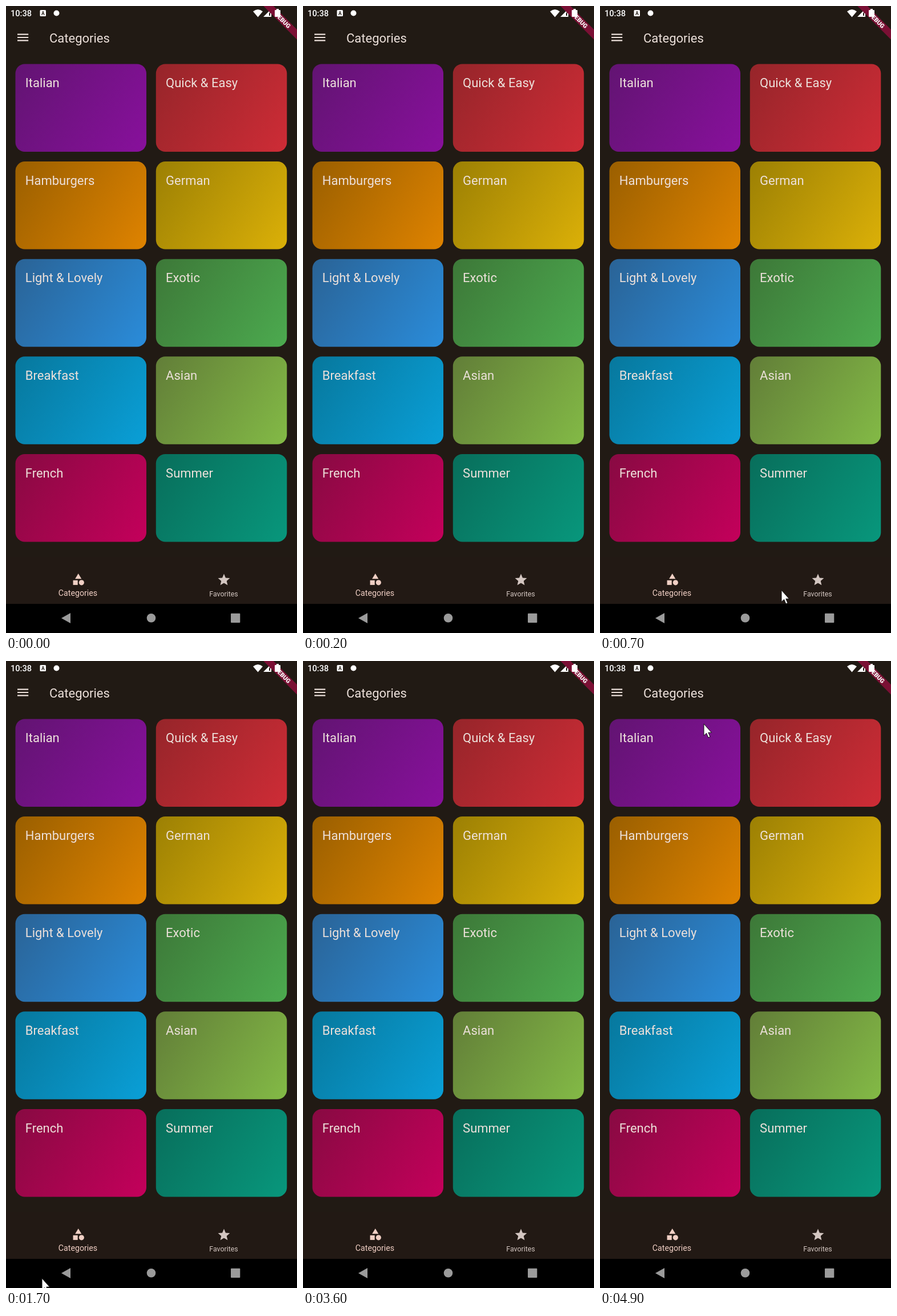
Recreate the animation shown at these times as an HTML page. Size 510x1097 px, loop 5.4 s.

```html
<!DOCTYPE html>
<html lang="en">
<head>
<meta charset="utf-8">
<title>Categories</title>
<style>
  html, body { margin: 0; width: 100%; height: 100%; overflow: hidden; background: #211a14; }
  svg { display: block; width: 510px; height: 1097px; font-family: Roboto, sans-serif; }
</style>
</head>
<body>
<svg viewBox="0 0 510 1097" xmlns="http://www.w3.org/2000/svg">
  <defs id="defs"></defs>
  <rect width="510" height="1097" fill="#211a14"/>
  <rect y="964" width="510" height="82" fill="#221914"/>
  <rect y="1046" width="510" height="51"/>

  <!-- status bar -->
  <g fill="#fff">
    <text x="8" y="18" font-size="14.6" font-weight="500">10:38</text>
    <rect x="59.5" y="7" width="10.5" height="11" rx="1.5"/>
    <text x="64.8" y="15.7" font-size="8.5" font-weight="700" text-anchor="middle" style="fill:#211a14">A</text>
    <circle cx="88.5" cy="12.5" r="5"/>
    <path d="M433 9.5Q441.500 2.500 450 9.500L441.500 19.500Z"/>
    <path fill-rule="evenodd" d="M465 5V19H451ZM463 10.500V17H461V12.500Z"/>
  </g>
  <g transform="translate(510) rotate(45)">
    <rect x="-45" y="29.100" width="90" height="12.500" fill="#7a1034"/>
  </g>
  <path d="M471 8Q471 7 472 7H474V5H478V7H480Q481 7 481 8V18Q481 19 480 19H472Q471 19 471 18Z" fill="#fff"/>
  <text transform="translate(510) rotate(45)" y="39.100" font-size="10.600" font-weight="900" text-anchor="middle" fill="#fff">DEBUG</text>

  <!-- app bar -->
  <path d="M20 49.600H39.200M20 55H39.200M20 60.400H39.200" stroke="#ece0da" stroke-width="2.100"/>
  <text x="76" y="63.500" font-size="22" fill="#ece0da">Categories</text>

  <g id="cards"></g>

  <!-- tabs -->
  <g transform="translate(114.500 991) scale(1.020)" fill="#f0cfc4">
    <path d="M12 2L6.500 11H17.500Z"/>
    <rect x="3" y="13.500" width="8" height="8"/>
    <circle cx="17.500" cy="17.500" r="4.500"/>
  </g>
  <path transform="translate(369.500 991.500) scale(1.040)" fill="#d3c6c1" d="M12 17.270L18.180 21l-1.640-7.030L22 9.240l-7.190-.61L12 2 9.190 8.630 2 9.240l5.460 4.730L5.820 21z"/>
  <g text-anchor="middle">
    <text x="126" y="1032" font-size="14.200" fill="#f0cfc4">Categories</text>
    <text x="381.500" y="1033" font-size="12.400" fill="#d3c6c1">Favorites</text>
  </g>

  <!-- system buttons -->
  <g fill="#9b9b9b">
    <path d="M97 1071L113 1062V1080Z"/>
    <circle cx="254.500" cy="1070.700" r="7.800"/>
    <rect x="394" y="1062.700" width="16.300" height="16.300" rx="1"/>
  </g>

  <path id="cursor" d="M0 0V20.500L4.600 16.300L7.800 24L11 22.600L7.800 15.200H13.500Z" fill="#fff" stroke="#111" stroke-width="1" stroke-linejoin="round" visibility="hidden"/>
</svg>
<script>
const LOOP = 5400;
const CARD = { w: 229.5, h: 153.5 };

const categories = [
  ["Italian", "#621472", "#88109c"],
  ["Quick &amp; Easy", "#96252a", "#ce2c36"],
  ["Hamburgers", "#9a5f00", "#df8300"],
  ["German", "#9c8004", "#dbb008"],
  ["Light &amp; Lovely", "#2a6396", "#2a8cda"],
  ["Exotic", "#3d7838", "#4caa4f"],
  ["Breakfast", "#07789d", "#0a9fd7"],
  ["Asian", "#627e38", "#83ba46"],
  ["French", "#880a42", "#c4005b"],
  ["Summer", "#086e5b", "#08977c"]
];

// Pointer rests: start, end, x, y
const rests = [
  [700, 1700, 318, 1022],
  [1700, 3400, 63, 1080],
  [4400, 4900, 475, 575],
  [4900, 5400, 182, 110]
];

const byId = id => document.getElementById(id);

function buildCards() {
  const { w, h } = CARD;
  let defs = "", cards = "";
  categories.forEach(([name, from, to], i) => {
    const x = 16.5 + (i % 2) * 246.3;
    const y = 101.5 + Math.floor(i / 2) * 170.6;
    defs += `<linearGradient id="g${i}" gradientUnits="userSpaceOnUse" x1="0" y1="0" x2="${w}" y2="${h}">
      <stop stop-color="${from}"/><stop offset="1" stop-color="${to}"/></linearGradient>`;
    cards += `<g transform="translate(${x} ${y})">
      <rect width="${w}" height="${h}" rx="16.5" fill="url(#g${i})"/>
      <text x="17.3" y="40.700" font-size="22" fill="#ece0da">${name}</text></g>`;
  });
  byId("defs").innerHTML = defs;
  byId("cards").innerHTML = cards;
}

function draw(t) {
  const rest = rests.find(([start, end]) => t >= start && t < end);
  const cursor = byId("cursor");
  cursor.setAttribute("visibility", rest ? "visible" : "hidden");
  if (rest) cursor.setAttribute("transform", `translate(${rest[2]} ${rest[3]})`);
}

const begin = performance.now();
function tick() {
  draw((performance.now() - begin) % LOOP);
  requestAnimationFrame(tick);
}

buildCards();
tick();
</script>
</body>
</html>
```
